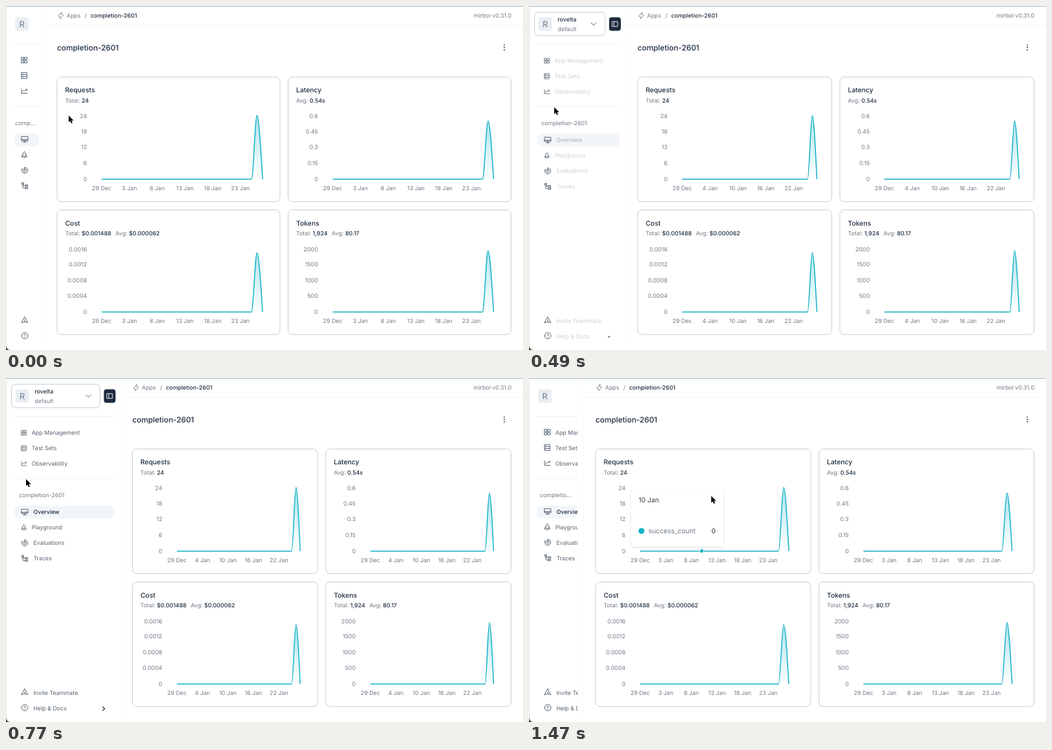
Recreate the animation shown at these times as an HTML page. Size 800 by 534 pixels, loop 1540 ms.

```html
<!DOCTYPE html>
<html lang="en">
<head>
<meta charset="utf-8">
<title>App overview</title>
<style>
  html, body { margin: 0; width: 100%; height: 100%; overflow: hidden; background: #fff; }
  svg { display: block; width: 100vw; height: 100vh; }
  text { font-family: Inter, sans-serif; text-rendering: geometricPrecision; white-space: pre; }
  .icon { fill: none; stroke: #44525f; stroke-width: .9; stroke-linejoin: round; stroke-linecap: round; }
</style>
</head>
<body>
<svg id="stage" viewBox="0 0 800 534"></svg>
<script>
const LOOP = 1540, STEP = 70, HOLD_START = 770, HOLD_END = 1190;
const CLOSED = 79, OPEN = 195.5, RIGHT = 781.5, GAP = 12.5;
const INK = '#1c2c3d', GREY = '#6f7a86', NAV = '#566370', TEAL = '#12b1c8', BORDER = '#bfc8d0';
const SMALL = 8.9, MEDIUM = 10.4, LARGE = 11.85;

// content left, cursor x, cursor y, nav text opacity, left edge the charts were last sized for
const steps = [
  [79, 97, 170], [79, 95, 169], [79, 87, 167], [79, 75, 164], [79, 62, 161], [79, 51, 159],
  [79, 44, 158], [168, 39, 157, .3, 160], [192.5, 35, 157, .55], [195.2, 33, 157, .8],
  [195.5, 32, 157, .95], [195.5, 31, 157],
  [195.5, 33, 157], [195.5, 66, 161], [195.5, 168, 176], [183, 256, 183, 1, 190], [103, 282, 183, 1, 117]
];
const HOVER_FIRST = 6, HOVER_LAST = 14, TOOLTIP_STEP = 16;

const charts = [
  { name: 'Requests', stats: ['Total:', '24'], ticks: ['24', '18', '12', '6', '0'], peak: 1 },
  { name: 'Latency', stats: ['Avg:', '0.54s'], ticks: ['0.6', '0.45', '0.3', '0.15', '0'], peak: .912 },
  { name: 'Cost', stats: ['Total:', '$0.001488', 'Avg:', '$0.000062'],
    ticks: ['0.0016', '0.0012', '0.0008', '0.0004', '0'], peak: .93 },
  { name: 'Tokens', stats: ['Total:', '1,924', 'Avg:', '80.17'],
    ticks: ['2000', '1500', '1000', '500', '0'], peak: .962 }
];

// icon paths are centred on 0,0
const navItems = [
  { label: 'App Management', y: 85, compact: true, lift: 1,
    icon: 'M-4.3-4.3h3.5v3.5h-3.5zM.8-4.3h3.5v3.5h-3.5zM-4.3.8h3.5v3.5h-3.5zM.8.8h3.5v3.5h-3.5z' },
  { label: 'Test Sets', y: 109, compact: true, lift: 1,
    icon: 'M-4-4.7h8v9.4h-8zM-4-1.6h8M-4 1.6h8M-2.3-3.1h.3M-2.3 0h.3M-2.3 3.1h.3' },
  { label: 'Observability', y: 133, compact: true, lift: 1,
    icon: 'M-4.3-3.5v7h8.8M-2.7 1L-.8-1.2 1 .2 4-2.7M2.3-2.7h1.7v1.6' },
  { label: 'Overview', y: 208, lift: 1, selected: true,
    icon: 'M-4.8-4.3h9.6v6.4h-9.6zM-4.8.4h9.6M0 2.1v2.1M-2.6 4.3h5.2' },
  { label: 'Playground', y: 232, compact: true, lift: 1,
    icon: 'M0-5C3-2.6 2.6.2 1.9 2.7h-3.8C-2.6.2-3-2.6 0-5M-2.3-.2L-4 2.2l.5 1.9 1.6-1.4M2.3-.2L4 2.2l-.5 1.9-1.6-1.4M-1 4.6h2M0-1.6v.2' },
  { label: 'Evaluations', y: 256, lift: 1,
    icon: 'M0-4.7A4.7 4.7 0 1 1-4.4-1.6M0-2.4A2.4 2.4 0 1 1-2.3.6M0-4.7V0L-4.2-2.5' },
  { label: 'Traces', y: 280, lift: 1,
    icon: 'M-4.5-4.7h3v2.4h-3zM1.6-1.5h3v2.4h-3zM1.6 2.3h3v2.4h-3zM-3-2.3V2.4q0 1.1 1.1 1.1H1.6M-3-.3H1.6' },
  { label: 'Invite Teammate', y: 489, icon: 'M0-5L4.8 4 0 2.4-4.8 4zM0 2.4V-.8' },
  { label: 'Help & Docs', y: 513,
    icon: 'M-4.9 0a4.9 4.9 0 1 1 9.8 0a4.9 4.9 0 1 1-9.8 0M-1.4-1.2C-1.2-3 1.5-2.9 1.4-1.1 1.3-.1 0-.1 0 1M0 2.6v.1' }
];

const escapeText = s => s.replace(/&/g, '&amp;');

function text(x, middle, content, { size = SMALL, fill = INK, weight = 400, anchor = 'start', opacity = 1 } = {}) {
  return `<text x="${x}" y="${middle + size * .364}" font-size="${size}" fill="${fill}" font-weight="${weight}"
    text-anchor="${anchor}" opacity="${opacity}">${escapeText(content)}</text>`;
}

const rect = (x, y, w, h, r, fill, stroke = 'none') =>
  `<rect x="${x}" y="${y}" width="${w}" height="${h}" rx="${r}" fill="${fill}" stroke="${stroke}" stroke-width=".9"/>`;

const icon = (x, y, d, scale = 1, extra = '') =>
  `<path class="icon" d="${d}" transform="translate(${x} ${y}) scale(${scale})" ${extra}/>`;

const line = (x1, y1, x2, y2, color) =>
  `<path d="M${x1} ${y1}L${x2} ${y2}" stroke="${color}"/>`;

const dayLabel = day => day < 3 ? `${29 + day} Dec` : `${day - 2} Jan`;

function chartCard(chart, x, y, cardWidth, plotWidth) {
  const left = x + 69, base = y + 158.5, height = 99, day = plotWidth / 29;
  const start = left + 27 * day, top = base - height * chart.peak, peakX = start + day, end = left + plotWidth;
  const spike = `C${start + day / 3} ${base} ${peakX - day / 3} ${top} ${peakX} ${top}
    C${peakX + day / 3} ${top} ${end - day / 3} ${(base + top) / 2} ${end} ${base}`;
  const stats = chart.stats.map((s, i) =>
    `<tspan fill="${i % 2 ? INK : GREY}" font-weight="${i % 2 ? 500 : 400}" dx="${i === 2 ? 6.5 : 0}">${s}${i % 2 ? '' : ' '}</tspan>`).join('');

  let out = rect(x, y, cardWidth, 193.5, 7, '#fff', BORDER)
    + text(x + 12.5, y + 20.5, chart.name, { size: MEDIUM, weight: 500 })
    + `<text x="${x + 12.5}" y="${y + 39.3}" font-size="${SMALL}">${stats}</text>`;
  chart.ticks.forEach((tick, i) => {
    const middle = i ? base - height + i * height / 4 : base - height + 1.5;
    out += text(x + 46.3, middle, tick, { fill: GREY, anchor: 'end' });
  });
  const interval = plotWidth > 212 ? 5 : 6;
  for (let d = 0; d < 27; d += interval)
    out += text(left + d * day, base + 14, dayLabel(d), { fill: GREY, anchor: 'middle' });
  return out
    + `<path d="M${start} ${base}${spike}Z" fill="url(#fade)"/>`
    + `<path d="M${left} ${base}H${start}${spike}" fill="none" stroke="${TEAL}" stroke-width="1.5" stroke-linejoin="round"/>`;
}

function tooltip(dotX) {
  return `<g filter="url(#shadow)">${rect(158, 172, 143, 89.5, 4, '#fff')}</g>`
    + `<circle cx="${dotX}" cy="268.5" r="3.2" fill="${TEAL}" stroke="#fff"/>`
    + text(169.5, 189.5, '10 Jan', { size: MEDIUM, fill: '#333b44' })
    + `<circle cx="174" cy="237.5" r="4.6" fill="${TEAL}"/>`
    + text(184.7, 237.5, 'success_count', { size: MEDIUM, fill: GREY })
    + text(288.7, 237.5, '0', { size: MEDIUM, fill: '#333b44', anchor: 'end' });
}

function workspaceHeader(left, open) {
  const boxRight = open ? left - 50 : left - 26.7;
  let out = rect(8.5, 9.7, boxRight - 8.5, 36.3, 6, '#fff', BORDER)
    + `<g clip-path="url(#sideClip)">`
    + text(44.3, 20.3, 'rovelta', { weight: 500 })
    + text(44.3, 35.3, 'default', { fill: GREY }) + '</g>';
  if (open) {
    out += icon(left - 68, 28, 'M-3.8-1.8L0 1.9 3.8-1.8')
      + rect(left - 44, 17.5, 18, 21, 4, INK)
      + icon(left - 35, 28, 'M-4.2-3.7h8.4v7.4h-8.4zM-1.5-3.7v7.4', 1, 'style="stroke:#fff"');
  }
  return out;
}

function sidebar(left, opacity, hover) {
  const progress = (left - CLOSED) / (OPEN - CLOSED);
  const edge = left - 28, wide = progress > .5, open = progress > .1;
  const caption = wide ? 'completion-2601' : open ? 'completio...' : 'comp...';
  const shift = hover || wide ? 0 : -1;

  let out = line(8, 59.5, left - 26, 59.5, '#eff2f4') + line(8, 155.5, left - 26, 155.5, '#eff2f4')
    + line(left - 18.5, 1, left - 18.5, 534, '#f8f9fa');
  if (hover) out += workspaceHeader(left, open);
  const avatarX = hover ? 14.7 : 14.2;
  out += rect(avatarX, 17.5, 21, 21, 4.5, '#e9eef3')
    + text(avatarX + 10.5, 28.2, 'R', { size: 13, fill: '#6b7c8c', anchor: 'middle' })
    + text(14 + 6 * Math.sqrt(progress), 181.3, caption, { fill: GREY })
    + rect(13, 198.3, edge - 13, 19.4, 5, '#f2f5f9')
    + '<g clip-path="url(#sideClip)">';

  for (const item of navItems) {
    const compact = item.compact && wide;
    const iconX = item.selected || !item.compact ? 29 : compact ? 27.7 : 28.3;
    const iconY = item.lift ? item.y + shift : item.y - 1.3;
    out += icon(iconX, iconY, item.icon, compact ? .87 : 1);
    if (open)
      out += text(compact ? 39.7 : item.compact ? 40.8 : 42.4, item.y, item.label,
        { fill: item.selected ? INK : NAV, weight: item.selected ? 500 : 400, opacity });
    else if (hover && !item.lift)
      out += text(34.8, item.y, '...', { fill: NAV });
  }
  if (wide)
    out += icon(left - 44.3, 513.5, 'M-1.4-2.8L1.5 0-1.4 2.8', 1, `style="stroke-width:1.2;stroke:${INK}"`)
      .replace('scale(1)', `scale(1 ${opacity < .6 ? .4 : 1})`);
  return out + '</g>';
}

function topBar(left) {
  return line(left - 18, 29.5, 800, 29.5, '#f4f5f7')
    + icon(left + 5.7, 15, 'M1.2-5L-4 .8-.6 2-1.2 5 4-.8.6-2z', 1, 'style="stroke:#75818d"')
    + text(left + 14.8, 14.7, 'Apps', { fill: GREY })
    + text(left + 43, 14.7, '/', { fill: GREY })
    + text(left + 52, 14.7, 'completion-2601', { weight: 500 })
    + text(782, 15.2, 'mirbol v0.31.0', { fill: GREY, anchor: 'end' })
    + text(left, 64.7, 'completion-2601', { size: LARGE, weight: 500 })
    + [60.6, 64.3, 68].map(y => `<circle cx="771" cy="${y}" r=".95" fill="${INK}"/>`).join('');
}

const cursor = (x, y) =>
  `<path d="M0 0V10.6L2.5 8.4 4.1 12.2 5.9 11.4 4.3 7.8H7.6Z" transform="translate(${x} ${y})"
    fill="#000" stroke="#fff" stroke-width=".9" paint-order="stroke"/>`;

function scene(index) {
  const [left, cursorX, cursorY, opacity = 1, chartLeft = left] = steps[index];
  const hover = index >= HOVER_FIRST && index <= HOVER_LAST;
  const widthFor = x => (RIGHT - x - GAP) / 2;
  const cardWidth = widthFor(left), plotWidth = widthFor(chartLeft) - 96;

  const defs = `<defs>
    <linearGradient id="fade" x1="0" y1="0" x2="0" y2="1">
      <stop offset="0" stop-color="${TEAL}" stop-opacity=".35"/>
      <stop offset="1" stop-color="${TEAL}" stop-opacity="0"/>
    </linearGradient>
    <filter id="shadow"><feDropShadow dx="0" dy="1.5" stdDeviation="1.5" flood-color="#25303b" flood-opacity=".15"/></filter>
    <clipPath id="sideClip"><rect width="${left - 27.5}" height="534"/></clipPath>
  </defs>`;

  return defs + rect(0, 0, 800, 534, 0, '#fff')
    + sidebar(left, opacity, hover) + topBar(left)
    + charts.map((chart, i) => chartCard(chart, left + (i % 2) * (cardWidth + GAP),
        110.2 + (i >> 1) * 206.3, cardWidth, plotWidth)).join('')
    + (index === TOOLTIP_STEP ? tooltip(left + 69 + 12 * plotWidth / 29) : '')
    + rect(0, 0, 800, 1, 0, '#a3bdc5') + rect(0, 1, .7, 533, 0, '#d9dfe1')
    + '<path d="M0 527Q.5 533.5 7 534H0Z" fill="#3f3b24"/>'
    + cursor(cursorX, cursorY);
}

function stepAt(time) {
  if (time < HOLD_START) return Math.floor(time / STEP);
  if (time < HOLD_END) return HOLD_START / STEP;
  return HOLD_START / STEP + 1 + Math.floor((time - HOLD_END) / STEP);
}

const stage = document.getElementById('stage');
const began = performance.now();
let shown = -1;

function render() {
  const index = stepAt((performance.now() - began) % LOOP);
  if (index !== shown) stage.innerHTML = scene(shown = index);
  requestAnimationFrame(render);
}
render();
</script>
</body>
</html>
```
